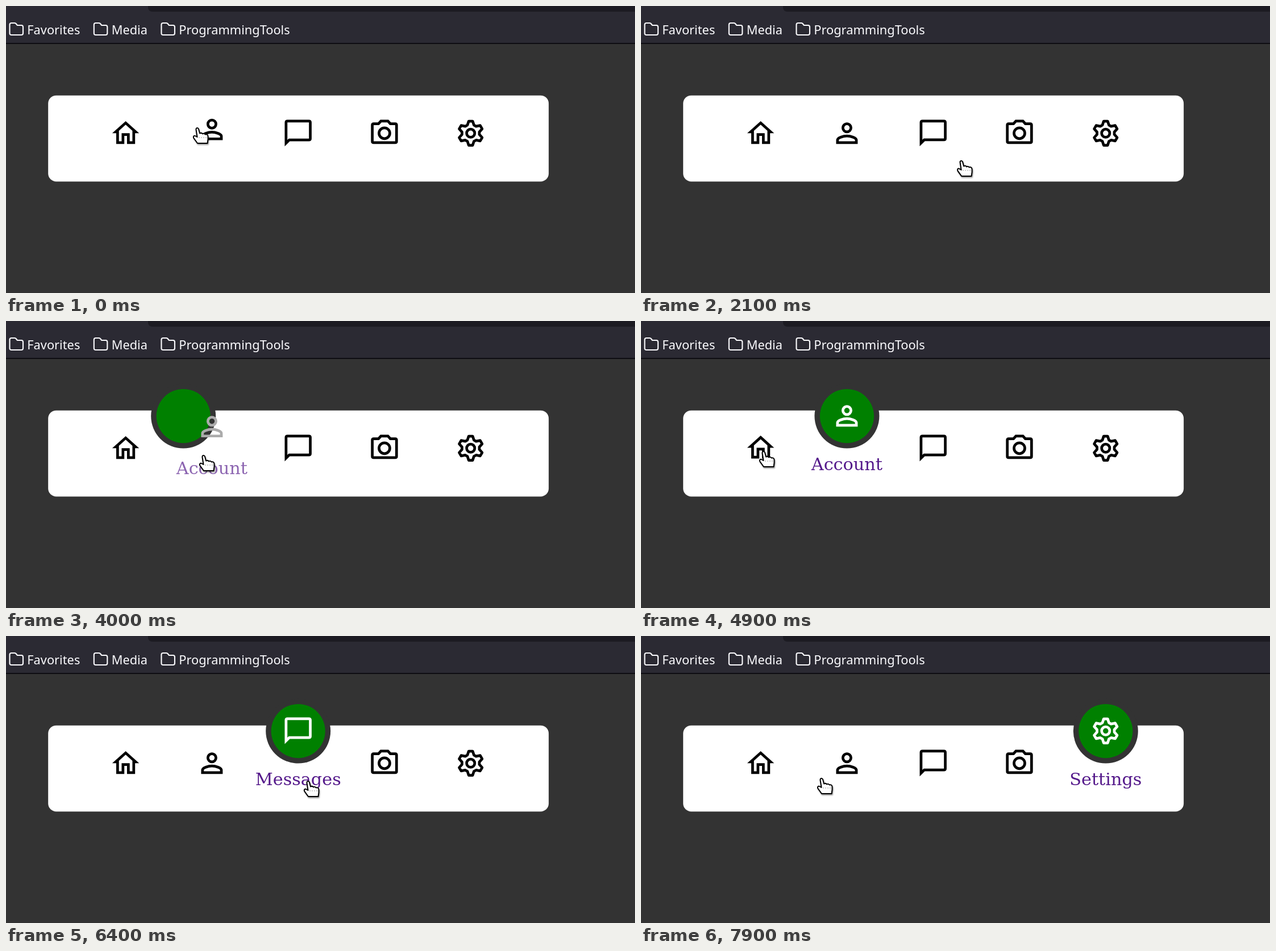
An HTML page for the animation above (8 s loop, 1107x506 px).

```html
<!DOCTYPE html>
<html lang="en">
<head>
<meta charset="utf-8">
<title>Navigation menu</title>
<style>
  html, body { margin: 0; width: 100%; height: 100%; overflow: hidden; background: #333; }
  svg { display: block; width: 1107px; height: 506px; }
  .bookmark { font: 21.8px "Noto Sans", sans-serif; fill: #fbfbfe; }
  .folder { fill: none; stroke: #fbfbfe; stroke-width: 2.1; stroke-linejoin: round; }
  .label { font: 30.3px "DejaVu Serif", serif; fill: #551a8b; text-anchor: middle; }
  .icon { fill: none; stroke: currentColor; stroke-width: 2; }
  .icon.solid { fill: currentColor; fill-rule: evenodd; stroke: none; }
  .icon.round { stroke-linejoin: round; }
  #cursor { filter: drop-shadow(1px 2px 1px rgba(0, 0, 0, .4)); }
  #cursor path { fill: #fff; stroke: #000; stroke-width: 2; stroke-linejoin: round; }
  #cursor .knuckles { fill: none; stroke: #999; stroke-width: 1; stroke-dasharray: 2 2; }
</style>
</head>
<body>
<svg viewBox="0 0 1107 506">
  <rect width="1107" height="66" fill="#2b2a33"/>
  <path d="M250 0V2Q250 10 258 10H1107V0Z" fill="#1c1b22"/>
  <rect y="65" width="1107" height="2" fill="#0e0d12"/>
  <g id="bookmarks"></g>
  <rect x="74.2" y="157.7" width="880.9" height="151.7" rx="14.2" fill="#fff"/>
  <g id="indicator">
    <circle r="57" fill="#333"/>
    <circle r="47.6" fill="#008000"/>
  </g>
  <g id="menu"></g>
  <g id="cursor">
    <g id="hand">
      <path d="M5.5 4C5 .5 9 0 10 3L12 10.5C14 9.5 16 10 17 11.5C18.5 10.5 20.5 11 21.5 12.5C24 11.5 26.5 13 26.5 16V21L25.5 28H8L1.5 19C0 16.5 1.5 14 4 15L7.5 17Z"/>
      <path class="knuckles" d="M10 18H24"/>
    </g>
    <path id="arrow" d="M6 2V29L12.5 23L17 32L21.5 30L17.5 21H26Z"/>
  </g>
</svg>
<script>
const LOOP = 8000, SLIDE = 270, HALF_HOP = 250, HOP = 9.5, RISE = 57, SCALE = 2.37;
const FIRST_X = 210.6, STEP_X = 151.8, LINKS_BOTTOM = 300, FINGER = 8;
const $ = id => document.getElementById(id);
const clamp = v => Math.min(1, Math.max(0, v));
const smooth = v => (v = clamp(v), v * v * (3 - 2 * v));
const easeOut = v => 1 - (1 - clamp(v)) ** 3;
const lerp = (a, b, p) => a + (b - a) * p;
const itemX = i => FIRST_X + STEP_X * i;

function add(parent, tag, attrs, text = '') {
  const el = document.createElementNS('http://www.w3.org/2000/svg', tag);
  for (const name in attrs) el.setAttribute(name, attrs[name]);
  el.textContent = text;
  return parent.appendChild(el);
}

const circle = (y, r) => `M${12 - r} ${y}a${r} ${r} 0 1 0 ${2 * r} 0a${r} ${r} 0 1 0 ${-2 * r} 0Z`;

// Each tooth runs valley, corner, corner, valley.
function gear() {
  const points = [];
  for (let tooth = 0; tooth < 360; tooth += 60)
    for (const [r, offset] of [[6.5, -22], [9.1, -9.2], [9.1, 9.2], [6.5, 22]]) {
      const a = (tooth + offset) * Math.PI / 180;
      points.push(`${12 + r * Math.sin(a)} ${12 - r * Math.cos(a)}`);
    }
  return `M${points.join('L')}Z` + circle(12, 3);
}

const items = [
  ['Home', 'M12 5.69l5 4.5V18h-2v-6H9v6H7v-7.81zM12 3L2 12h3v8h6v-6h2v6h6v-8h3z', 'solid'],
  ['Account', circle(8, 3) + 'M5 19V17C5 15.4 9.3 14 12 14S19 15.4 19 17V19Z'],
  ['Messages', 'M4 3H20Q21 3 21 4V16Q21 17 20 17H5.4L3 19.4V4Q3 3 4 3Z'],
  ['Camera', 'M4 5H7.6L9.4 3H14.6L16.4 5H20Q21 5 21 6V18Q21 19 20 19H4Q3 19 3 18V6Q3 5 4 5Z' + circle(12, 4)],
  ['Settings', gear(), 'round']
].map(([name, d, style = '']) => ({
  icon: add($('menu'), 'path', { d, class: 'icon ' + style }),
  label: add($('menu'), 'text', { class: 'label' }, name)
}));

let left = 5;
for (const name of ['Favorites', 'Media', 'ProgrammingTools']) {
  add($('bookmarks'), 'path', {
    class: 'folder', transform: `translate(${left} 0)`,
    d: 'M1.5 33Q1.5 30 4.5 30H10Q11.5 30 12.5 31L15 34H22Q25 34 25 37V48Q25 51 22 51H4.5Q1.5 51 1.5 48Z'
  });
  const text = add($('bookmarks'), 'text', { class: 'bookmark', x: left + 32.3, y: 50 }, name);
  left += text.getComputedTextLength() + 55.3;
}

// Pointer moves: start time, duration, destination.
const moves = [
  [0, 1, 329, 214], [620, 230, 188, 232], [930, 230, 318, 241], [1540, 360, 530, 296],
  [1900, 200, 555, 272], [2100, 300, 664, 262], [2400, 400, 806, 250], [3100, 100, 770, 352],
  [3200, 200, 497, 304], [3400, 300, 340, 236], [4550, 300, 290, 232], [4850, 50, 208, 229],
  [4960, 140, 505, 243], [5560, 140, 400, 245], [5840, 60, 524, 255], [6740, 340, 806, 258],
  [7250, 180, 345, 262], [7430, 470, 310, 250]
];
const clicks = [[3835, 1], [4950, 0], [6130, 2], [7130, 4]];

function pointer(t) {
  const k = moves.findLastIndex(([start]) => start <= t);
  const [start, duration, x, y] = moves[k];
  const [, , fromX, fromY] = moves[Math.max(0, k - 1)];
  const p = easeOut((t - start) / duration);
  return { x: lerp(fromX, x, p), y: lerp(fromY, y, p) };
}

// Every time the pointer enters a link, its icon hops once.
const hops = [{ start: -340, item: 1 }];
for (let start = 0, last = 1; start < LOOP; start += 2) {
  const { x, y } = pointer(start);
  const item = y < LINKS_BOTTOM ? Math.round((x + FINGER - FIRST_X) / STEP_X) : -1;
  if (item !== last && item >= 0) hops.push({ start, item });
  last = item;
}

function hopHeight(i, t) {
  const heights = hops.filter(h => h.item === i)
    .map(h => smooth(1 - Math.abs((t - h.start) / HALF_HOP - 1)));
  return HOP * Math.max(0, ...heights);
}

function draw(t) {
  const n = clicks.findLastIndex(([time]) => time <= t);
  const [clicked, active] = clicks[n] ?? [0, -1];
  const previous = clicks[n - 1]?.[1] ?? -1;
  const p = smooth((t - clicked) / SLIDE);

  $('indicator').style.display = active < 0 ? 'none' : '';
  const x = lerp(itemX(Math.max(0, previous)), itemX(active), p);
  $('indicator').setAttribute('transform', `translate(${x} 167.6)`);

  items.forEach(({ icon, label }, i) => {
    const level = i === active ? p : i === previous ? 1 - p : 0;
    const y = 224.3 - RISE * level - hopHeight(i, t) * (1 - level);
    const shade = Math.round(255 * level);
    icon.setAttribute('transform', `translate(${itemX(i)} ${y}) scale(${SCALE}) translate(-12 -12)`);
    icon.style.color = `rgb(${shade}, ${shade}, ${shade})`;
    label.setAttribute('x', itemX(i));
    label.setAttribute('y', 263 + 20 * (1 - level));
    label.style.opacity = level;
  });

  const at = pointer(t), overLinks = at.y < LINKS_BOTTOM;
  $('cursor').setAttribute('transform', `translate(${at.x} ${at.y})`);
  $('hand').style.display = overLinks ? '' : 'none';
  $('arrow').style.display = overLinks ? 'none' : '';
}

const begin = performance.now();
function tick() {
  draw((performance.now() - begin) % LOOP);
  requestAnimationFrame(tick);
}
tick();
</script>
</body>
</html>
```
